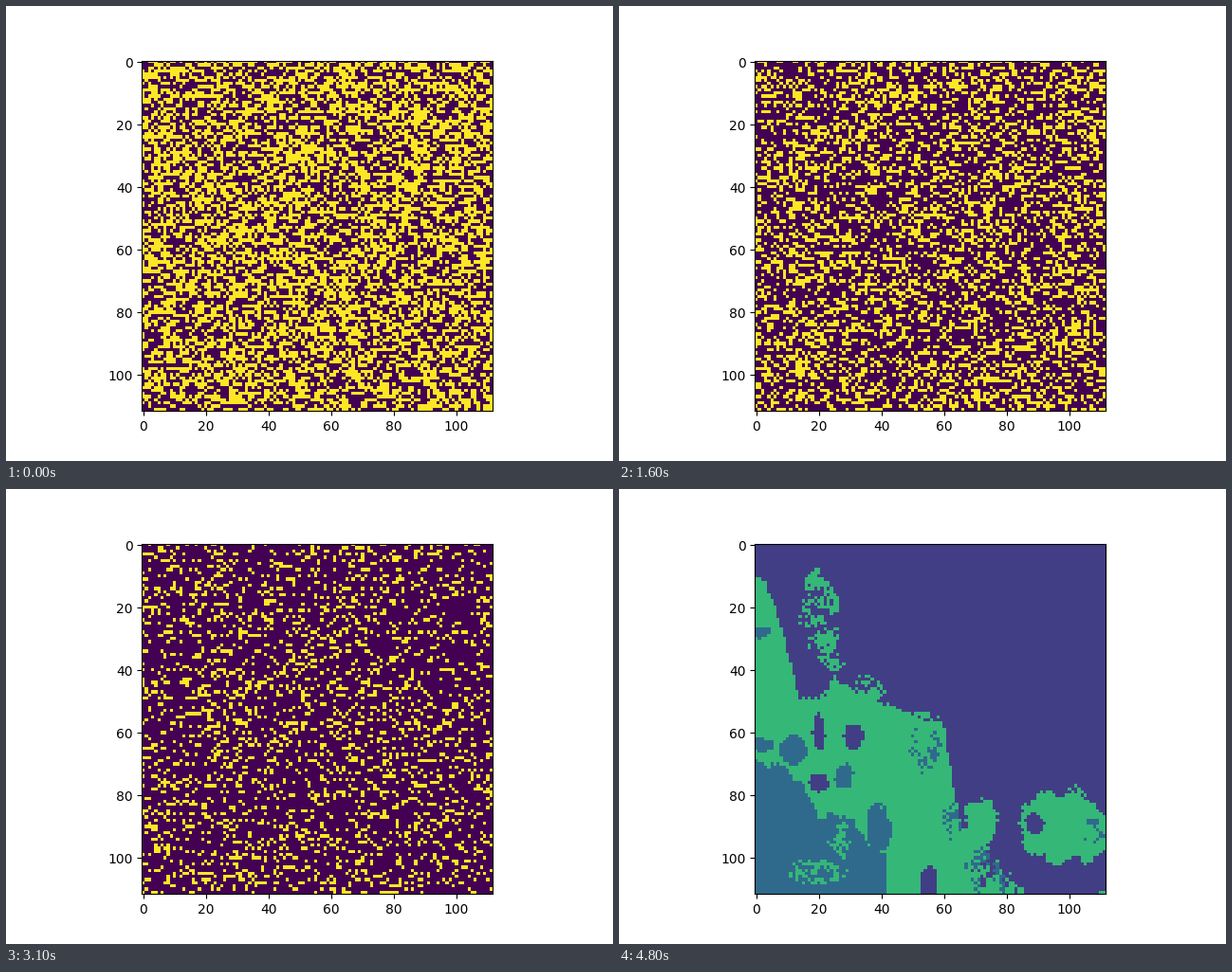
A matplotlib script for the animation above (4.9 s loop, 640 by 480 pixels).

```python
import numpy as np
import matplotlib.pyplot as plt
from matplotlib.animation import FuncAnimation

N = 112
FRAMES = 49
EARLY, LATE = 41, 46    # where noise gives way to the two maps
yy, xx = np.mgrid[0:N, 0:N].astype(float)


def smooth(rng, cells):
    """Smooth noise in -1..1 with the given number of cells per side."""
    knots = rng.uniform(-1, 1, (cells + 1, cells + 1))
    at, pos = np.linspace(0, cells, N), np.arange(cells + 1)
    rows = np.array([np.interp(at, pos, r) for r in knots])
    return np.array([np.interp(at, pos, c) for c in rows.T]).T


def ragged(rng, size=2.0):
    return size * (smooth(rng, 28) + rng.uniform(-0.5, 0.5, (N, N)))


def below(front, rng, size=2.0):
    """Cells under a front line, with a ragged edge."""
    return yy + ragged(rng, size) > front


def blob(rng, x, y, rx, ry, density=1.0):
    """Ragged ellipse, thinned into speckles when density is below one."""
    r = np.hypot((xx - x) / rx, (yy - y) / ry) + ragged(rng, 0.2)
    grain = smooth(rng, 37) + rng.uniform(-0.6, 0.6, (N, N))
    return (r < 1) & (grain >= np.quantile(grain, 1 - density))


def noise(i):
    """Binary noise whose cells lean toward short horizontal runs."""
    rng = np.random.default_rng(1000 + i)
    density = np.interp(i, [0, 10, 21, 27, 36, 40],
                        [0.5, 0.43, 0.29, 0.11, 0.31, 0.2])
    g = rng.normal(size=(N, N))
    g += 0.15 * np.roll(g, 1, axis=1) - 0.15 * np.roll(g, 1, axis=0)
    return (g > np.quantile(g, 1 - density)).astype(float)


def early_map(shift):
    rng = np.random.default_rng(44)
    y = yy - shift
    width = 2.2 + 0.035 * xx
    p = 1 / (1 + np.exp((40 + 4.3 * np.sqrt(xx) - y) / width))
    z = np.where(rng.random((N, N)) < p, 0.085, 0.0)
    z[below(59 + 0.98 * xx + 4 * smooth(rng, 14) + shift, rng)] = 0.3
    stripe = np.cos(2 * np.pi * (xx - 2.5 + 0.15 * (N - y)) / 12)
    core = below(88 + 0.55 * xx + shift, rng, 3)
    z[core & (stripe + ragged(rng, 0.3) > 0.1) & (z > 0.2)] = 0.53
    return z


def late_map(shift):
    rng = np.random.default_rng(48)
    dark, blue, green = 0.185, 0.345, 0.665
    z = np.full((N, N), dark)
    coast = np.interp(xx, [0, 3, 9, 14, 20, 25, 60, 65, 88],
                      [11, 12, 30, 50, 51, 43, 60, 88, 112])
    z[below(coast + shift, rng)] = green
    for isle in [(72, 89, 5, 8), (98, 91, 15, 12),
                 (20, 22, 6, 13, 0.5), (24, 34, 4, 7, 0.4),
                 (36, 46, 5, 5, 0.5), (50, 57, 9, 4, 0.5)]:
        z[blob(rng, *isle)] = green
    for hole in [(20, 60, 2, 6), (31, 61, 3, 4), (20, 76, 3, 3),
                 (55, 109, 3, 6), (101, 105, 4, 5), (89, 89, 3, 3),
                 (78, 104, 8, 8, 0.25)]:
        z[blob(rng, *hole)] = dark
    basin = np.interp(xx, [0, 10, 20, 30, 41, 42],
                      [70, 71, 86, 88, 101, 118])
    z[below(basin + shift, rng)] = blue
    for pool in [(12, 66, 4, 5), (2, 28, 3, 2), (2, 64, 4, 2),
                 (28, 74, 3, 4), (39, 91, 4, 8), (54, 64, 5, 8, 0.3),
                 (63, 88, 4, 6, 0.4), (74, 103, 7, 8, 0.35),
                 (107, 91, 4, 4, 0.4)]:
        z[blob(rng, *pool) & (z == green)] = blue
    for fleck in [(18, 104, 10, 4, 0.25), (26, 92, 4, 8, 0.25)]:
        z[blob(rng, *fleck)] = green
    return z


def grid(i):
    if i < EARLY:
        return noise(i)
    if i < LATE:
        return early_map(4.0 * (44 - i))
    return late_map(3.0 * (48 - i))


fig, ax = plt.subplots(figsize=(6.4, 4.8), dpi=100)
image = ax.imshow(grid(0), cmap="viridis", vmin=0, vmax=1)


def update(i):
    image.set_data(grid(i))
    return [image]


anim = FuncAnimation(fig, update, frames=FRAMES, interval=100,
                     repeat=True, repeat_delay=0, blit=False)
plt.show()
```
